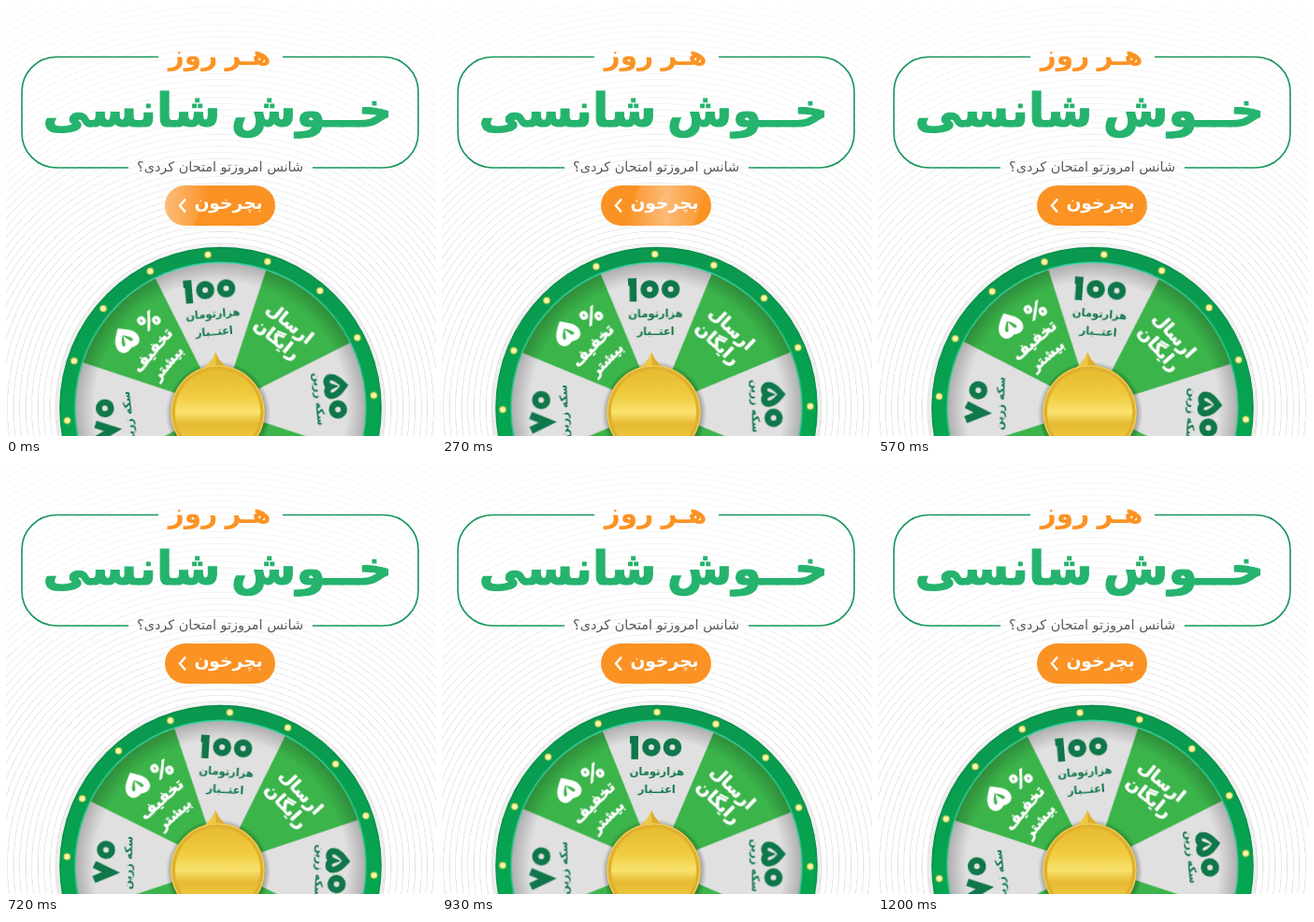
An HTML page that plays this animation: 460x460 px, repeating every 1230 ms.

```html
<!DOCTYPE html>
<html lang="fa">
<head>
<meta charset="utf-8">
<title>هر روز خوش شانسی</title>
<style>
  html, body { margin: 0; width: 100%; height: 100%; overflow: hidden; background: #fff; }
  .stage { position: relative; width: 460px; height: 460px; overflow: hidden; }
  .lines {
    position: absolute; inset: 0;
    background: repeating-radial-gradient(circle at 229.5px 430px, #e6e6e6 0, #ebebeb .7px, transparent 1.4px, transparent 6.5px);
    mask-image: linear-gradient(#0004, #0008 35%, #000 60%);
    -webkit-mask-image: linear-gradient(#0004, #0008 35%, #000 60%);
  }
  svg { position: absolute; inset: 0; display: block; }
  text { font-family: "DejaVu Sans", sans-serif; font-weight: 700; text-anchor: middle; direction: rtl; }
  .title { font-size: 50.5px; fill: #25b36e; stroke: #25b36e; stroke-width: 1.2; }
  .top { font-size: 29.5px; fill: #fb9323; }
  .ask { font-size: 14.4px; font-weight: 400; fill: #58595b; }
  .cta { font-size: 18.7px; fill: #fff; }
  .dark { fill: #0f774a; }
  .dark text { font-size: 11.5px; }
  .light { fill: #fff; }
  .light text { stroke: #fff; stroke-width: .6; }
  .ink { fill: none; stroke-width: 6.8; }
  .dark .ink { stroke: #0f774a; }
  .light .ink { stroke: #fff; }
  .light .percent { font: 900 24px Inter, sans-serif; direction: ltr; }

  .spin { animation: swing 1.23s infinite; }
  .sheen { animation: sweep 1.23s infinite; }
  @keyframes swing {
    0% { transform: rotate(-4.7deg); animation-timing-function: steps(12); }
    48.78% { transform: rotate(5.1deg); animation-timing-function: steps(12); }
    97.56%, 100% { transform: rotate(-4.7deg); }
  }
  @keyframes sweep {
    0% { transform: translateX(165px); animation-timing-function: steps(12); }
    48.78%, 100% { transform: translateX(329px); }
  }
</style>
</head>
<body>
<div class="stage">
<div class="lines"></div>
<svg width="460" height="460" viewBox="0 0 460 460">
  <defs>
    <linearGradient id="rim" x1="0" y1="0" x2="0" y2=".6">
      <stop offset="0" stop-color="#0a9850"/>
      <stop offset="1" stop-color="#05a650"/>
    </linearGradient>
    <linearGradient id="lip" x1="0" y1="0" x2="1" y2="0">
      <stop offset="0" stop-color="#1fc184"/>
      <stop offset=".5" stop-color="#2bd6a4"/>
      <stop offset="1" stop-color="#1fc184"/>
    </linearGradient>
    <radialGradient id="shade">
      <stop offset=".87" stop-color="#000" stop-opacity="0"/>
      <stop offset="1" stop-color="#000" stop-opacity=".22"/>
    </radialGradient>
    <radialGradient id="drop">
      <stop offset=".9" stop-color="#000" stop-opacity=".25"/>
      <stop offset="1" stop-color="#000" stop-opacity="0"/>
    </radialGradient>
    <linearGradient id="gold" x1="0" y1="0" x2="0" y2="1">
      <stop offset="0" stop-color="#e6bb30"/>
      <stop offset=".3" stop-color="#f0cb3f"/>
      <stop offset=".5" stop-color="#f9e26c"/>
      <stop offset=".64" stop-color="#e6ba33"/>
      <stop offset="1" stop-color="#f3d54c"/>
    </linearGradient>
    <linearGradient id="shine">
      <stop offset="0" stop-color="#fff" stop-opacity="0"/>
      <stop offset=".5" stop-color="#fff" stop-opacity=".38"/>
      <stop offset="1" stop-color="#fff" stop-opacity="0"/>
    </linearGradient>
    <clipPath id="pill"><rect x="170" y="192" width="118" height="43" rx="21.5"/></clipPath>
    <path id="wedge" d="M0 0L-59.3-143.2A155 155 0 0 1 59.3-143.2Z"/>
    <circle id="zero" r="6.4"/>
    <path id="five" d="M0-9C6-4 10 0 10 5C10 11 2 11 0 6C-2 11-10 11-10 5C-10 0-6-4 0-9Z"/>
    <path id="seven" d="M-8-10L0 8L8-10" stroke-width="8"/>
  </defs>

  <g fill="none" stroke="#17965a" stroke-width="1.6">
    <path d="M163 54.5H54A37 37 0 0 0 17 91.5V136A37 37 0 0 0 54 173H131"/>
    <path d="M296 54.5H404A37 37 0 0 1 441 91.5V136A37 37 0 0 1 404 173H328"/>
  </g>

  <text class="top" x="259" y="63">هـر</text>
  <text class="top" x="200" y="63">روز</text>
  <text class="title" x="327" y="128.5">خــوش</text>
  <text class="title" x="134.5" y="128.5">شانسی</text>
  <text class="ask" x="229" y="177">شانس امروزتو امتحان کردی؟</text>

  <g clip-path="url(#pill)">
    <rect x="170" y="192" width="118" height="43" fill="#fb9224"/>
    <g class="sheen"><path d="M-38 235L-22 192H52L36 235Z" fill="url(#shine)"/></g>
  </g>
  <path d="M192 206.5L186 213.5L192 220.5" fill="none" stroke="#fff" stroke-width="2.4"/>
  <text class="cta" x="238" y="217">بچرخون</text>

  <g transform="translate(229.5 430)">
    <circle cy="2" r="179" fill="url(#drop)"/>
    <circle r="172.3" fill="url(#rim)"/>
    <circle r="171.5" fill="none" stroke="#067a3f" stroke-opacity=".5"/>
    <circle r="156.6" fill="url(#lip)"/>
    <g class="spin">
      <circle r="155" fill="#e0e0e0"/>
      <g fill="#3bb44a" transform="rotate(.5)">
        <use href="#wedge" transform="rotate(45)"/>
        <use href="#wedge" transform="rotate(-45)"/>
        <use href="#wedge" transform="rotate(135)"/>
        <use href="#wedge" transform="rotate(-135)"/>
      </g>
      <circle r="155" fill="url(#shade)"/>

      <g fill="none" stroke-linecap="round" stroke-dasharray="0 1">
        <circle r="164.5" pathLength="16" stroke="#c5cf45" stroke-width="7.6"/>
        <circle r="164.5" pathLength="16" stroke="#fdf5ae" stroke-width="5.6"/>
      </g>

      <g class="dark">
        <g transform="translate(-1 -127)">
          <path d="M-28-12H-19V13H-26.5V-4H-28Z"/>
          <g class="ink"><use href="#zero" x="-5"/><use href="#zero" x="17.5"/></g>
        </g>
        <text y="-97">هزارتومان</text>
        <text y="-78">اعتــبار</text>
      </g>

      <g class="light" transform="rotate(-45)">
        <g transform="translate(6 -122) rotate(14)">
          <use class="ink" href="#five" x="-16"/>
          <text class="percent" x="16" y="8">%</text>
        </g>
        <text y="-90" font-size="16.5">تخفیف</text>
        <text y="-69" font-size="15">بیشتر</text>
      </g>

      <g class="light" transform="rotate(44)">
        <text y="-111" font-size="18.5">ارسال</text>
        <text y="-89" font-size="18.5">رایگان</text>
      </g>

      <g class="dark" transform="rotate(89.5)">
        <g class="ink" transform="translate(0 -125)">
          <use href="#five" x="-12"/><use href="#zero" x="13"/>
        </g>
        <text y="-102">سکه زرین</text>
      </g>

      <g class="dark" transform="rotate(-91.5)">
        <g class="ink" transform="translate(0 -125)">
          <use href="#seven" x="-11"/><use href="#zero" x="13" y="2"/>
        </g>
        <text y="-95">سکه زرین</text>
      </g>
    </g>
  </g>

  <circle cx="227" cy="436" r="56" fill="url(#drop)"/>
  <path d="M204 392Q219 384 224 370.500Q229 384 246 392Z" fill="#efc842"/>
  <path d="M224 370.500Q229 384 246 392H225Z" fill="#dcae30"/>
  <circle cx="226.5" cy="434.5" r="50.3" fill="#e0b02e"/>
  <circle cx="226.5" cy="434.5" r="49.6" fill="none" stroke="#f3d968"/>
  <circle cx="226.5" cy="434.5" r="45.500" fill="url(#gold)"/>
</svg>
</div>
</body>
</html>
```
